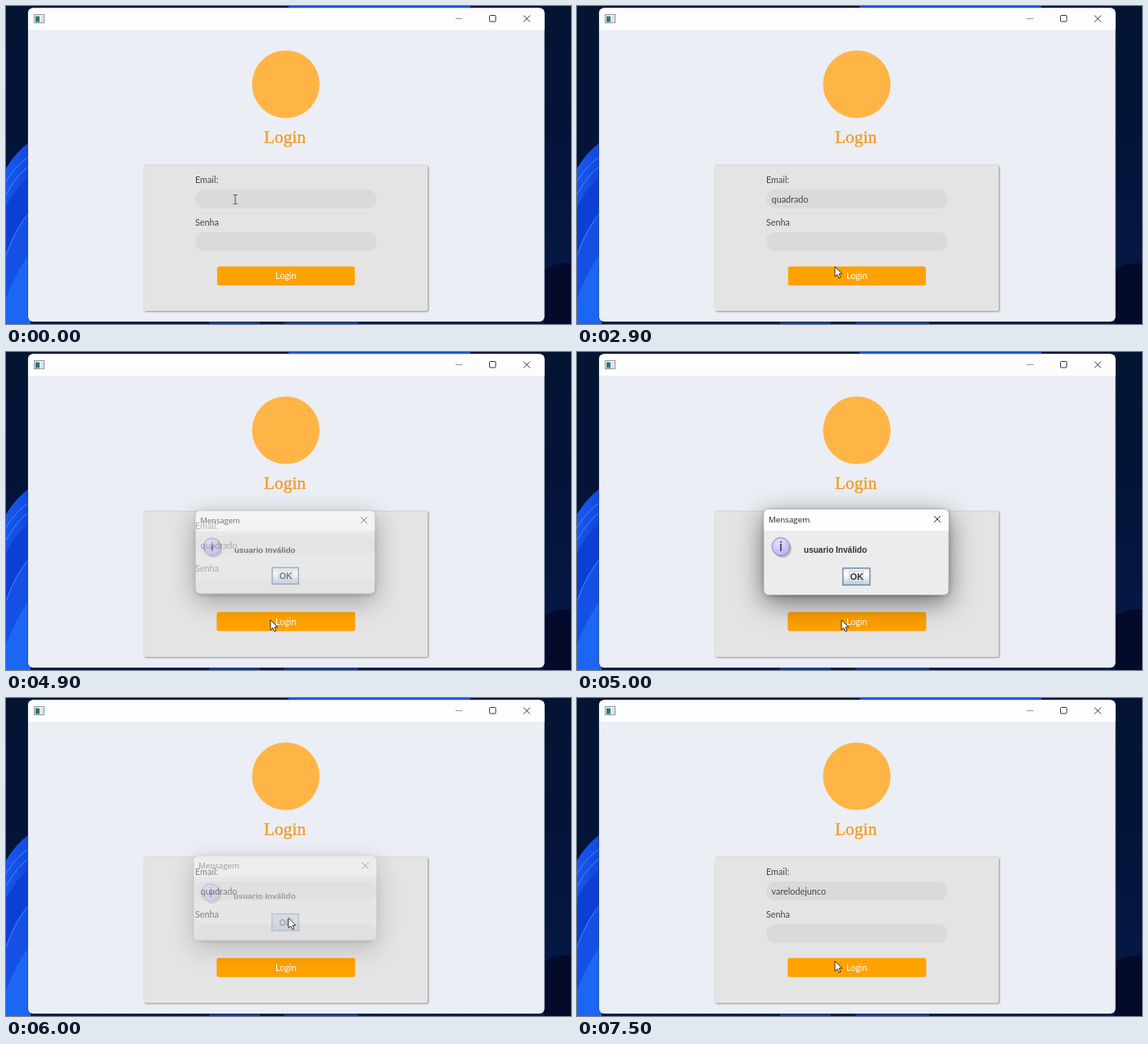
Animation of 690x388 px, one loop 8 s. Source, as an HTML page:

```html
<!DOCTYPE html>
<html lang="pt">
<head>
<meta charset="utf-8">
<title>Login</title>
<style>
  html, body { margin: 0; width: 100%; height: 100%; overflow: hidden; background: #06132a; }
  svg { display: block; width: 100vw; height: 100vh; }
  text { white-space: pre; }
  .ui { font: 10.8px Lato, sans-serif; fill: #444; }
  .head { font: 21.4px "Liberation Serif", serif; fill: #f39a20; stroke: #f39a20; stroke-width: .35; }
  .title { font: 9.75px "Open Sans", sans-serif; fill: #222; }
  .bold { font: bold 10.05px "Liberation Sans", sans-serif; fill: #333; }
  .info { font: bold 16px "Liberation Sans", sans-serif; fill: #56529a; }
  .line { fill: none; stroke: #333; stroke-width: 1; }
  .panel { filter: drop-shadow(1px 1px 1px rgba(0, 0, 0, .4)); }
  #dialog {
    filter: drop-shadow(0 1px 3px rgba(0, 0, 0, .2)) drop-shadow(0 9px 16px rgba(0, 0, 0, .5));
    transform-origin: 340px 244px;
  }
</style>
</head>
<body>
<svg viewBox="0 0 690 388" preserveAspectRatio="none">
  <defs>
    <linearGradient id="night" x2="0" y2="1">
      <stop stop-color="#041532"/><stop offset=".45" stop-color="#04143a"/><stop offset="1" stop-color="#051a48"/>
    </linearGradient>
    <linearGradient id="petal" x2="1" y2="1">
      <stop stop-color="#1a5cf0"/><stop offset=".5" stop-color="#1148e0"/><stop offset="1" stop-color="#0b34c0"/>
    </linearGradient>
    <linearGradient id="metal" x2="0" y2="1">
      <stop stop-color="#dde8f3"/><stop offset=".35" stop-color="#fff"/><stop offset="1" stop-color="#b8cfe5"/>
    </linearGradient>
    <radialGradient id="orb" cx=".4" cy=".3" r=".75">
      <stop stop-color="#e6e4ff"/><stop offset="1" stop-color="#b4b0ea"/>
    </radialGradient>
    <clipPath id="frame"><rect x="27" y="2.5" width="630.5" height="382.5" rx="6"/></clipPath>
  </defs>

  <!-- desktop -->
  <rect width="690" height="388" fill="url(#night)"/>
  <path d="M657 322Q672 312 690 314V388H657Z" fill="#040a2a"/>
  <path d="M345 0H567V4H345Z" fill="#1a4fd8"/>
  <path d="M248 384H310V388H248ZM340 384H430V388H340Z" fill="#123a9c"/>
  <path d="M0 198Q12 178 30 165V388H0Z" fill="url(#petal)"/>
  <path d="M0 245Q14 218 30 208V250Q12 272 0 304Z" fill="#0e3fd4"/>
  <path d="M0 304Q12 270 30 250V300Q14 324 0 356Z" fill="#1450e6"/>
  <path d="M0 356Q14 322 30 300V388H0Z" fill="#1c66f4"/>
  <path d="M0 214Q12 194 30 182M0 230Q14 204 30 194M0 304Q12 270 30 250" fill="none" stroke="#3f8cfa"/>

  <!-- window -->
  <rect x="26.5" y="2" width="631.5" height="383.5" rx="6.5" fill="#3a4664"/>
  <g clip-path="url(#frame)">
    <rect x="27" y="2" width="631" height="384" fill="#ebeef4"/>
    <rect x="27" y="2" width="631" height="27" fill="#fdfdfe"/>
  </g>
  <rect x="34.5" y="10.5" width="12" height="10" fill="#f4f6f7" stroke="#8b9499"/>
  <rect x="36" y="12.5" width="5" height="7" fill="#2f7377"/>
  <path d="M42.5 13.5h3M42.5 16h3M42.5 18.5h3" stroke="#b9c0c4"/>
  <path class="line" d="M549 15.5h8.5" style="stroke:#999"/>
  <rect class="line" x="590.5" y="11.5" width="7.5" height="7.5" rx="1"/>
  <path class="line" d="M632 11.5l8 8m0-8l-8 8"/>

  <circle cx="341.7" cy="95.5" r="41.3" fill="#ffb546"/>
  <text class="head" x="315" y="167">Login</text>

  <rect class="panel" x="168.5" y="194" width="346.5" height="178" rx="2" fill="#e4e4e4"/>
  <path d="M169 194.3H515" stroke="#d3d3d3" stroke-width=".8"/>
  <text class="ui" x="231" y="215.5">Email:</text>
  <rect x="231" y="224" width="221.5" height="23" rx="11.5" fill="#dadada"/>
  <text class="ui" id="email" x="237.6" y="239.7"></text>
  <rect id="caret" y="228.5" width="1" height="14.5" fill="#222"/>
  <text class="ui" x="231" y="267.5">Senha</text>
  <rect x="231" y="276" width="221.5" height="23" rx="11.5" fill="#dadada"/>
  <rect id="button" rx="2.5" fill="#ffa200"/>
  <text class="ui" x="329" y="332.5" style="fill:#fff">Login</text>

  <!-- message box -->
  <g id="dialog">
    <rect x="228" y="192" width="226" height="104.5" rx="6" fill="#ececec" stroke="#a5a5a5" stroke-width=".7"/>
    <path d="M228.3 218V198q0-5.7 5.7-5.7H448q5.7 0 5.7 5.7V218Z" fill="#fdfdfd"/>
    <text class="title" x="234" y="208">Mensagem</text>
    <path class="line" d="M436 200l8 8m0-8l-8 8"/>
    <circle cx="251" cy="240" r="11" fill="#000" opacity=".2"/>
    <circle cx="249" cy="237.5" r="11" fill="url(#orb)" stroke="#8a86c4"/>
    <text class="info" x="249" y="243" text-anchor="middle">i</text>
    <text class="bold" x="277" y="245">usuario Inválido</text>
    <rect id="ok" x="324.7" y="263.7" width="33" height="20.6" stroke="#768ba3" stroke-width="1.5"/>
    <rect x="332.5" y="267.5" width="17" height="13" fill="none" stroke="#b8cbdd" stroke-width=".8"/>
    <text class="bold" x="333.5" y="278.4" style="font-size:10.9px">OK</text>
  </g>

  <path id="beam" d="M-2.5-5.5H-.7L0-5 .7-5.5H2.5M0-5V5M-2.5 5.5H-.7L0 5 .7 5.5H2.5" fill="none" stroke="#444" stroke-width=".9"/>
  <path id="arrow" d="M0 0V12.2L2.9 9.6 4.9 14 6.9 13.1 5 8.8H8.8Z" fill="#fff" stroke="#222" stroke-width=".9" stroke-linejoin="round"/>
</svg>

<script>
const LOOP = 8000, STEP = 100;
const el = id => document.getElementById(id);
const [email, caret, button, dialog, ok, beam, arrow] =
  ["email", "caret", "button", "dialog", "ok", "beam", "arrow"].map(el);

// time, x, y
const mouse = [
  [0, 280, 236], [1600, 280, 236], [1700, 281, 238], [1800, 281, 238],
  [2200, 290, 262], [2500, 290, 262], [2900, 315, 318], [3300, 323, 327],
  [5300, 323, 327], [5800, 345, 268.5], [6200, 345, 268.5],
  [6300, 326, 238], [6600, 326, 238], [7500, 315, 321], [LOOP, 315, 321]
];
// time, opacity, scale
const popup = [
  [0, 0, .94], [4800, 0, .94], [4900, .6, .97], [5000, 1, 1],
  [5800, 1, 1], [5900, .8, .996], [6000, .36, .988], [6100, .12, .975],
  [6200, 0, .96], [LOOP, 0, .96]
];
const word = "quadrado", user = "varelodejunco";

const ease = p => p * p * (3 - 2 * p);

function at(keys, t) {
  const i = Math.max(1, keys.findIndex(k => k[0] >= t));
  const a = keys[i - 1], b = keys[i];
  const p = ease((t - a[0]) / (b[0] - a[0]));
  return a.slice(1).map((v, n) => v + (b[n + 1] - v) * p);
}

const show = (node, on) => { node.style.display = on ? "" : "none"; };
const within = (t, a, b) => t >= a && t < b;

function set(node, attrs) {
  for (const k in attrs) node.setAttribute(k, attrs[k]);
}

function draw(t) {
  const typed = Math.max(0, Math.min(word.length, (t - 800) / STEP));
  const text = t < 6300 ? word.slice(0, typed) : user;
  if (email.textContent !== text) email.textContent = text;

  const caretOn = within(t, 100, 600) || within(t, 800, 2100);
  show(caret, caretOn);
  if (caretOn) set(caret, { x: 237.6 + (text ? email.getComputedTextLength() : 0) });

  const grow = t >= 3100 ? .5 : 0;
  set(button, { x: 257.8 - grow, y: 317.8 - grow, width: 168.2 + 2 * grow, height: 23.2 });

  const [alpha, scale] = at(popup, t);
  show(dialog, alpha > 0);
  dialog.style.opacity = alpha;
  dialog.style.transform = `scale(${scale})`;
  set(ok, { fill: t >= 5800 ? "#b8cfe5" : "url(#metal)" });

  const [x, y] = at(mouse, t);
  const overField = alpha === 0 && (within(y, 224, 247) || within(y, 276, 299));
  const pos = { transform: `translate(${x} ${y})` };
  show(beam, overField);
  show(arrow, !overField);
  set(beam, pos);
  set(arrow, pos);
}

const start = performance.now();
function tick() {
  const t = (performance.now() - start) % LOOP;
  draw(Math.floor(t / STEP) * STEP);
  requestAnimationFrame(tick);
}
tick();
</script>
</body>
</html>
```
